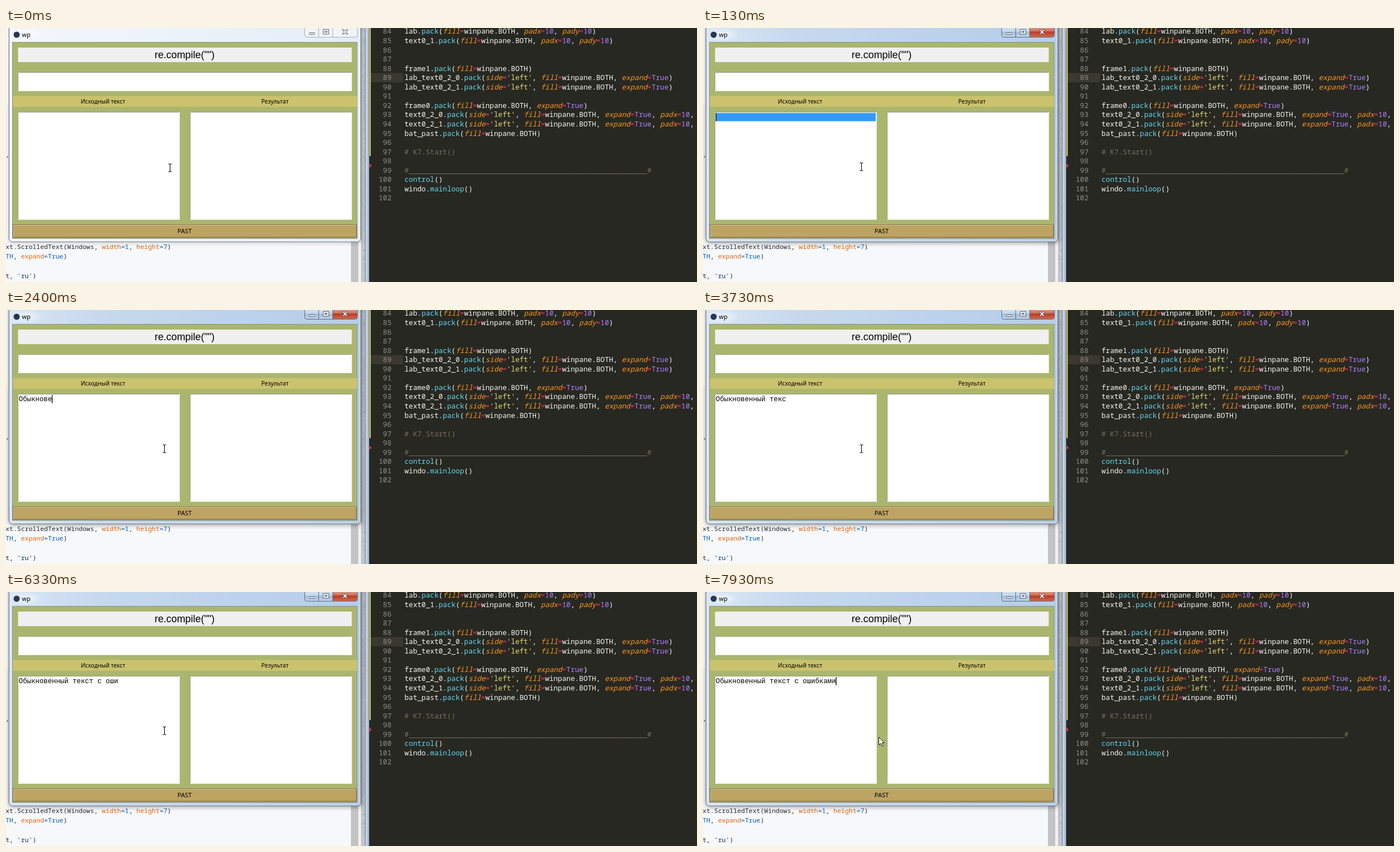
These frames come from a looping animation (1232x454 px, 8 s). An HTML page:

```html
<!DOCTYPE html>
<html lang="en">
<head>
<meta charset="utf-8">
<title>Text tool</title>
<style>
  html, body { margin: 0; width: 100%; height: 100%; overflow: hidden; background: #272822; }
  svg { display: block; width: 100vw; height: 100vh; }
  text { white-space: pre; }
  .code { font: 12.66px "Noto Sans Mono", monospace; }
  .web { font: 11.45px "Noto Sans Mono", monospace; }
  .ui { font: 10.2px "Noto Sans", sans-serif; text-anchor: middle; }
  .typed { font: 12.3px "Liberation Mono", monospace; }
  .num { fill: #8f908a; text-anchor: end; }
</style>
</head>
<body>
<svg viewBox="0 0 1232 454" preserveAspectRatio="none">
  <defs>
    <filter id="soft" x="-10%" y="-10%" width="120%" height="120%"><feGaussianBlur stdDeviation="4"/></filter>
    <linearGradient id="glassOn">
      <stop offset="0" stop-color="#d9e6f5"/><stop offset=".25" stop-color="#c6d9ee"/>
      <stop offset="1" stop-color="#b5cde9"/>
    </linearGradient>
    <linearGradient id="glassOff">
      <stop offset="0" stop-color="#f3f7fb"/><stop offset="1" stop-color="#e4edf7"/>
    </linearGradient>
    <linearGradient id="btnOn" x2="0" y2="1">
      <stop offset="0" stop-color="#d5e3f2"/><stop offset=".45" stop-color="#c3d5e9"/>
      <stop offset=".5" stop-color="#a3bcd8"/><stop offset="1" stop-color="#bcd3ea"/>
    </linearGradient>
    <linearGradient id="closeOn" x2="0" y2="1">
      <stop offset="0" stop-color="#dea093"/><stop offset=".42" stop-color="#cf6f5c"/>
      <stop offset=".48" stop-color="#b93a22"/><stop offset="1" stop-color="#d5694c"/>
    </linearGradient>
    <linearGradient id="edge">
      <stop offset="0" stop-color="#dce7f3"/><stop offset=".5" stop-color="#b4c9e2"/>
      <stop offset="1" stop-color="#a5bcd8"/>
    </linearGradient>
  </defs>

  <!-- web page and desktop behind the window -->
  <rect width="634" height="454" fill="#fff"/>
  <rect y="137" width="615" height="317" fill="#f6f8fa"/>
  <rect x="615" width="13" height="454" fill="#c3c3c5"/>
  <rect x="628" width="5" height="454" fill="#f1f1f2"/>
  <rect x="633" width="8" height="454" fill="#c3c4c9"/>
  <g id="grain"></g>
  <g id="page" class="web"></g>

  <!-- editor -->
  <rect x="640" width="8" height="454" fill="url(#edge)"/>
  <path d="M640.5 0V454" stroke="#66778c"/>
  <path d="M647.5 0V454" stroke="#4d5a69"/>
  <rect id="shade" x="5" y="-20" width="630" height="404" rx="7" fill="#000" filter="url(#soft)"/>
  <rect x="648" width="584" height="454" fill="#272822"/>
  <rect x="650" y="80.5" width="58" height="16.5" fill="#3a3931"/>
  <rect x="648" width="2.2" height="229" fill="#e0d35c"/>
  <path d="M648 242l4 4l-4 4z" fill="#e2323c"/>
  <g id="editor" class="code"></g>

  <!-- tool window -->
  <rect id="frame" x="5.5" y="-20" width="627" height="402" rx="6" stroke="#56636f"/>
  <rect x="6.5" y="-20" width="625" height="401" rx="5" fill="none" stroke="#fff" stroke-opacity=".65"/>
  <ellipse cx="36" cy="12" rx="22" ry="8" fill="#fff" opacity=".45" filter="url(#soft)"/>
  <circle cx="19" cy="12" r="5.5" fill="#27384f"/>
  <text class="ui" x="36" y="16" style="font-size:11px">wp</text>
  <g id="buttons">
    <path id="minmax" d="M532.5 -2H582.5V16.5H536.5Q532.5 16.5 532.5 12.5Z"/>
    <path d="M557.5 0V16.5"/>
    <path id="close" d="M582.5 -2H626.5V12.5Q626.5 16.5 622.5 16.5H582.5Z"/>
    <g fill="#fff" stroke="#505866">
      <rect x="540.5" y="8.5" width="10" height="3" rx="1"/>
      <path fill-rule="evenodd" d="M565.5 2.5h10v8.5h-10zM568.5 5.5h4v2.5h-4z"/>
      <path d="M599.5 3h3l2 2.3l2-2.3h3l-3.3 4l3.3 4h-3l-2-2.3l-2 2.3h-3l3.3-4z"/>
    </g>
  </g>
  <rect x="11.5" y="25.5" width="614.5" height="350.5" fill="#aab66d" stroke="#87948a"/>
  <rect x="21.5" y="35" width="595" height="26" fill="#f0f0f0"/>
  <text x="318.5" y="54.2" text-anchor="middle" style="font:17.9px 'Liberation Sans',sans-serif">re.compile("")</text>
  <rect x="12" y="121.5" width="614" height="19.5" fill="#cac26d"/>
  <text class="ui" x="173" y="135.3">Исходный текст</text>
  <text class="ui" x="479.5" y="135.3">Результат</text>
  <g id="fields"></g>
  <rect x="12.5" y="351.5" width="613" height="23.5" fill="#bda463" stroke="#87754a"/>
  <path d="M13.5 374V352.5H624.5" fill="none" stroke="#d6c592"/>
  <path d="M14 373.5H624.5V353" fill="none" stroke="#98844f"/>
  <text class="ui" x="318.5" y="367.4" style="font-size:11px">PAST</text>

  <rect id="selection" x="23.5" y="152" width="284.5" height="14.6" fill="#3399ff"/>
  <text id="typed" class="typed" x="22.8" y="163.2"></text>
  <rect id="caret" y="152" width="1.3" height="14.6"/>
  <path id="beam" d="M-3 -7H-1L0 -6.3L1 -7H3M0 -6.3V6.3M-3 7H-1L0 6.3L1 7H3" fill="none" stroke="#000" stroke-width="1.1"/>
  <path id="arrow" d="M.5 .5V14.5L3.7 11.5L6 16.7L8.3 15.7L6 10.7H10.4Z" fill="#fff" stroke="#000" stroke-width=".9"/>
</svg>
<script>
const NS = 'http://www.w3.org/2000/svg';
const $ = id => document.getElementById(id);

function add(parent, tag, attrs, text) {
  const el = document.createElementNS(NS, tag);
  for (const k in attrs) el.setAttribute(k, attrs[k]);
  if (text) el.textContent = text;
  return parent.appendChild(el);
}

// Syntax colouring
const dark = {
  plain: '#f8f8f2', comment: '#75715e', string: '#e6db74', arg: '#fd971f',
  call: '#66d9ef', number: '#ae81ff', op: '#f92672', constant: '#f8f8f2'
};
const light = {
  plain: '#24292e', comment: '#6a737d', string: '#032f62', arg: '#e36209',
  call: '#24292e', number: '#005cc5', op: '#005cc5', constant: '#005cc5'
};

function kind(token, next) {
  if (token[0] === '#') return 'comment';
  if (token[0] === "'") return 'string';
  if (token === '=') return 'op';
  if (/^(True|\d+)$/.test(token)) return 'number';
  if (/^\w/.test(token)) {
    if (next === '=') return 'arg';
    if (next === '(') return 'call';
    if (/^[A-Z]+$/.test(token)) return 'constant';
  }
  return 'plain';
}

function codeLine(parent, x, y, src, theme) {
  const line = add(parent, 'text', { x, y });
  for (const m of src.matchAll(/#.*|'[^']*'|\w+|=|[^\w='#]+/g)) {
    const type = kind(m[0], src[m.index + m[0].length]);
    const span = add(line, 'tspan', { fill: theme[type] }, m[0]);
    if (type === 'arg' && theme === dark) span.setAttribute('font-style', 'italic');
  }
}

const both = 'fill=winpane.BOTH';
const pad = 'padx=10, pady=10';
const side = `.pack(side='left', ${both}, expand=True`;
const source = [
  `lab.pack(${both}, ${pad})`,
  `text0_1.pack(${both}, ${pad})`.replace(`${both}, ${pad}`, `${both}, ${pad}`),
  '', '',
  `frame1.pack(${both})`,
  `lab_text0_2_0${side})`,
  `lab_text0_2_1${side})`,
  '',
  `frame0.pack(${both}, expand=True)`,
  `text0_2_0${side}, ${pad})`,
  `text0_2_1${side}, ${pad})`,
  `bat_past.pack(${both})`,
  '', '# K7.Start()', '',
  '#' + '_'.repeat(56) + '#',
  'control()', 'windo.mainloop()', ''
];
source.forEach((src, i) => {
  const y = 10.4 + i * 16.56;
  add($('editor'), 'text', { x: 687.3, y, class: 'num' }, String(84 + i));
  codeLine($('editor'), 710.5, y, src, dark);
});

const page = (y, src) => codeLine($('page'), -.8, y, src, light);
page(229.5, ',');
page(395, 'xt.ScrolledText(Windows, width=1, height=7)');
page(412.3, 'TH, expand=True)');
page(447, "t, 'ru')");

// Rough wallpaper strip
let seed = 7;
const random = () => (seed = seed * 16807 % 2147483647) / 2147483647;
for (let i = 0; i < 120; i++) {
  add($('grain'), 'rect', {
    x: 633 + random() * 5, y: random() * 454, width: 2, height: 1 + random() * 3,
    fill: random() < .5 ? '#adafb6' : '#d6d7db', opacity: .6
  });
}

function field(x, y, w, h) {
  add($('fields'), 'rect', { x, y, width: w, height: h, fill: '#fff' });
  add($('fields'), 'path', { d: `M${x + .5} ${y + h}V${y + .5}H${x + w}`, fill: 'none', stroke: '#9b9e8c' });
  add($('fields'), 'path', { d: `M${x} ${y + h - .5}H${x + w - .5}V${y}`, fill: 'none', stroke: '#e6e8da' });
}
field(21, 79, 596, 34);
field(21, 150, 289, 193);
field(328, 150, 289, 193);

// Timeline, in ms
const LOOP = 8000, ACTIVE = 70, SELECT = 130, ERASE = 5800;
const phrase = 'Обыкновенный текст с ошибками';
const keys = [870, 1070, 1200, 1600, 1800, 2070, 2130, 2400, 2530, 2670, 2730, 2870, 2930,
  3200, 3330, 3600, 3730, 3870, 4000, 4930, 5070, 5270, 5530, 6070, 6330, 6530, 6600, 6670, 6870, 7070];
const blinks = [130, 730, 1070, 1670, 2000, 2530, 2870, 3470, 3800, 4470, 4800, 5330, 5670,
  6270, 6600, 7130, 7470];
const mouse = [
  [0, 292.5, 250, 'beam'], [130, 282.5, 248, 'beam'], [7670, 291.5, 239, 'beam'],
  [7730, 312, 220, 'arrow'], [7800, 327, 212, 'arrow'], [7870, 322, 236, 'arrow'], [7930, 313, 259, 'arrow']
];

const passed = (times, t) => times.filter(at => at <= t).length;
const show = (id, on) => $(id).setAttribute('visibility', on ? 'visible' : 'hidden');

function draw(t) {
  const active = t >= ACTIVE;
  $('frame').setAttribute('fill', active ? 'url(#glassOn)' : 'url(#glassOff)');
  $('minmax').setAttribute('fill', active ? 'url(#btnOn)' : '#f0f4f9');
  $('close').setAttribute('fill', active ? 'url(#closeOn)' : '#f0f4f9');
  $('buttons').setAttribute('stroke', active ? '#5c6b7e' : '#a3aebb');
  $('shade').setAttribute('opacity', active ? .4 : .2);

  const count = passed(keys, t) - (t >= ERASE ? 1 : 0);
  $('typed').textContent = phrase.slice(0, count);
  $('caret').setAttribute('x', 22.7 + count * 7.38);
  show('caret', passed(blinks, t) % 2);
  show('selection', t >= SELECT && t < keys[0]);

  const [, x, y, shape] = mouse.filter(p => p[0] <= t).pop();
  for (const id of ['beam', 'arrow']) show(id, id === shape);
  $(shape).setAttribute('transform', `translate(${x} ${y})`);
}

const start = performance.now();
function tick() {
  draw((performance.now() - start) % LOOP);
  requestAnimationFrame(tick);
}
draw(0);
tick();
</script>
</body>
</html>
```
